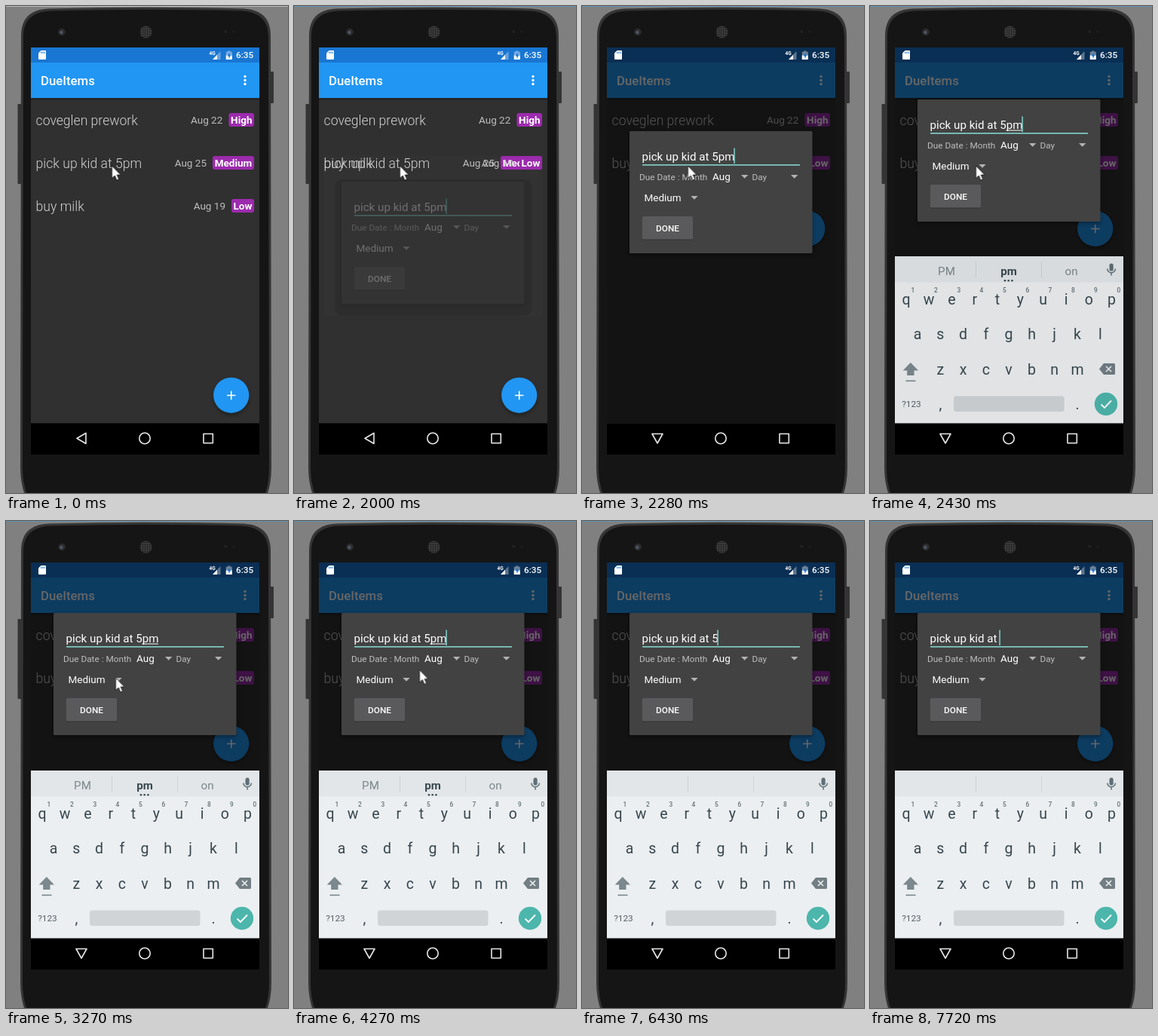
Animation, 374 px wide and 646 px high, one loop 8 s. Source, as an HTML page:

```html
<!DOCTYPE html>
<html lang="en">
<head>
<meta charset="utf-8">
<title>Task list</title>
<style>
html, body { margin: 0; width: 100%; height: 100%; overflow: hidden; background: #808080; }
svg { display: block; width: 374px; height: 646px; font-family: Roboto, "Open Sans", sans-serif; }
.task { font-size: 17.6px; font-weight: 300; fill: #d2d2d2; }
.date { font-size: 13.5px; fill: #bdbdbd; }
.tag { font-size: 13.5px; font-weight: 700; fill: #fff; }
.badge { fill: #9c2bad; }
.s12 { font-size: 11.8px; }
.s13 { font-size: 13.5px; }
.s15 { font-size: 15.15px; }
.med { font-weight: 500; }
.bold { font-weight: 700; }
.mid { text-anchor: middle; }
.keys { font-size: 19.5px; fill: #37474f; text-anchor: middle; }
.hints { font-size: 8.4px; font-weight: 500; fill: #667177; text-anchor: middle; }

/* All changes are hard cuts on one shared 8 s clock. */
.a { animation: 8s step-end infinite; }
#top { animation-name: top; }
#oldRow { animation-name: oldRow; }
#milk { animation-name: milk; }
#ghost { animation-name: ghost; }
#fab { animation-name: fab; }
#dim { animation-name: dim; }
#back { animation-name: back; }
#down { animation-name: down; }
#dialog { animation-name: dialog; }
#kbd { animation-name: kbd; }
#press { animation-name: press; }
#words1 { animation-name: words1; }
#words2 { animation-name: words2; }
#dots { animation-name: dots; }
#five { animation-name: five; }
#pee { animation-name: pee; }
#em { animation-name: em; }
#compose { animation-name: compose; }
#caret { animation-name: caret; }
#mouse { animation-name: mouse; }

@keyframes top { 0% { fill: #bdbdbd } 12.875%, 100% { fill: #5c93b6 } }
@keyframes oldRow { 0% { opacity: 1 } 26.625%, 100% { opacity: 0 } }
@keyframes milk { 0% { transform: none } 25%, 100% { transform: translateY(-57px) } }
@keyframes ghost { 0% { opacity: 0 } 25% { opacity: 1 } 26.625%, 100% { opacity: 0 } }
@keyframes fab { 0% { transform: translateY(221px) } 28.5%, 100% { transform: none } }
@keyframes dim { 0% { opacity: 0 } 26.625% { opacity: .48 } 28.5%, 100% { opacity: .6 } }
@keyframes back { 0% { opacity: 1 } 26.625%, 100% { opacity: 0 } }
@keyframes down { 0% { opacity: 0 } 26.625%, 100% { opacity: 1 } }
@keyframes dialog {
  0% { opacity: 0; transform: translateY(111px) }
  25% { opacity: .32; transform: translateY(111px) }
  26.625% { opacity: .9; transform: translateY(111px) }
  28.5% { opacity: 1; transform: translateY(44px) }
  30.375% { opacity: 1; transform: translateY(2px) }
  32%, 100% { opacity: 1; transform: none }
}
@keyframes kbd {
  0% { opacity: 0; transform: translateY(1px) }
  30.375% { opacity: .95; transform: translateY(1px) }
  32%, 100% { opacity: 1; transform: none }
}
@keyframes press {
  0% { opacity: 0 } 73.125% { opacity: 1 } 78.5% { opacity: 0 }
  83.875% { opacity: 1 } 85.75%, 100% { opacity: 0 }
}
@keyframes words1 { 0% { opacity: 1 } 75%, 100% { opacity: 0 } }
@keyframes words2 { 0% { opacity: 0 } 75% { opacity: 1 } 80.375%, 100% { opacity: 0 } }
@keyframes dots { 0% { opacity: 1 } 80.375%, 100% { opacity: 0 } }
@keyframes five { 0% { visibility: visible } 83.875%, 100% { visibility: hidden } }
@keyframes pee { 0% { visibility: visible } 76.875%, 100% { visibility: hidden } }
@keyframes em { 0% { visibility: visible } 73.125%, 100% { visibility: hidden } }
@keyframes compose {
  0% { width: 0 } 30.375% { width: 21.5px } 73.125% { width: 8.5px } 76.875%, 100% { width: 0 }
}
@keyframes caret {
  0% { opacity: 1; transform: none }
  35.5% { opacity: 0; transform: none }
  42.75% { opacity: 1; transform: none }
  47.75% { opacity: 0; transform: none }
  53.375% { opacity: 1; transform: none }
  60.375% { opacity: 0; transform: none }
  65.75% { opacity: 1; transform: none }
  73.125% { opacity: 1; transform: translateX(-13px) }
  76.875% { opacity: 1; transform: translateX(-22px) }
  83.875% { opacity: 1; transform: translateX(-30px) }
  91.125% { opacity: 0; transform: translateX(-30px) }
  96.5%, 100% { opacity: 1; transform: translateX(-30px) }
}
@keyframes mouse {
  0% { opacity: 1; transform: translate(140.5px, 212px) }
  40.875% { opacity: 1; transform: translate(145.5px, 208px) }
  42.75% { opacity: 1; transform: translate(151px, 204px) }
  44.25% { opacity: 1; transform: translate(156.5px, 200px) }
  46.25% { opacity: 1; transform: translate(157.5px, 199px) }
  47.75% { opacity: 1; transform: translate(158.5px, 197px) }
  49.625% { opacity: 1; transform: translate(163.5px, 188px) }
  51.5% { opacity: 1; transform: translate(163.5px, 189px) }
  53.375% { opacity: 1; transform: translate(166.5px, 197.5px) }
  73.125%, 100% { opacity: 0; transform: translate(166.5px, 197.5px) }
}
</style>
</head>
<body>
<svg viewBox="0 0 374 646" width="374" height="646">
  <defs>
    <filter id="soft" x="-30%" y="-30%" width="160%" height="160%"><feGaussianBlur stdDeviation="2.5"/></filter>
    <linearGradient id="shade" x1="0" y1="0" x2="0" y2="1">
      <stop offset="0" stop-opacity=".35"/><stop offset="1" stop-opacity="0"/>
    </linearGradient>
    <pattern id="mesh" width="3" height="3" patternUnits="userSpaceOnUse">
      <rect width="3" height="3" fill="#404040"/><circle cx="1.5" cy="1.5" r="1" fill="#181818"/>
    </pattern>
    <clipPath id="screen"><rect x="33" y="55" width="303" height="540"/></clipPath>
  </defs>

  <!-- phone -->
  <rect width="374" height="646" fill="#808080"/>
  <rect x="15.5" y="130" width="6" height="106" rx="1" fill="#343434"/>
  <rect x="350" y="87" width="5" height="42" rx="1" fill="#343434"/>
  <path d="M24 646Q19 630 19 612L20 40C20 16 32 5 56 3.500Q186 0 315 3.500C339 5 351 16 351 40L352 612Q352 632 347 646Z" fill="#353535"/>
  <path d="M27 646Q22 630 22 612L23 41C23 19 35 8 58 6.500Q186 3 313 6.500C336 8 348 19 348 41L349 612Q349 632 344 646Z" fill="#151515"/>
  <circle cx="74" cy="34.500" r="4.800" fill="#2c2c2c"/>
  <circle cx="73.500" cy="35" r="2.200" fill="#4f5566"/>
  <circle cx="185.500" cy="34.500" r="8" fill="url(#mesh)"/>
  <circle cx="291.500" cy="34" r="2.500" fill="#1f1f1f"/>
  <circle cx="302" cy="34" r="2" fill="#1d1d1d"/>
  <rect id="top" class="a" width="374" height="1" fill="#bdbdbd"/>

  <g clip-path="url(#screen)">
    <rect x="33" y="55" width="303" height="540" fill="#303030"/>

    <!-- list -->
    <g id="ghost" class="a">
      <rect x="39" y="198" width="290" height="214" fill="#323232"/>
      <rect x="54" y="230" width="262" height="181" rx="11" fill="#2d2d2d"/>
    </g>
    <g>
      <text class="task" x="39.600" y="157.500">coveglen prework</text>
      <text class="date" x="245" y="156">Aug 22</text>
      <rect class="badge" x="295.500" y="142" width="33.500" height="18" rx="3"/>
      <text class="tag mid" x="312.300" y="156">High</text>
    </g>
    <g id="oldRow" class="a">
      <text class="task" x="39.600" y="214.500">pick up kid at 5pm</text>
      <text class="date" x="223.700" y="213">Aug 25</text>
      <rect class="badge" x="274" y="199" width="55" height="18" rx="3"/>
      <text class="tag mid" x="301.500" y="213">Medium</text>
    </g>
    <g id="milk" class="a">
      <text class="task" x="39.600" y="271.500">buy milk</text>
      <text class="date" x="248.700" y="270">Aug 19</text>
      <rect class="badge" x="299" y="256" width="30" height="18" rx="3"/>
      <text class="tag mid" x="314" y="270">Low</text>
    </g>

    <g id="fab" class="a">
      <circle cx="298.700" cy="298" r="24" opacity=".3" filter="url(#soft)"/>
      <circle cx="298.700" cy="295.300" r="23.600" fill="#2196f3"/>
      <path d="M293 295.500h11.500M298.700 289.700v11.500" stroke="#fff" stroke-width="1.600"/>
    </g>

    <!-- bars -->
    <rect x="33" y="122" width="303" height="4" fill="url(#shade)"/>
    <rect x="33" y="75" width="303" height="47" fill="#2196f3"/>
    <rect x="33" y="55" width="303" height="20" fill="#1976d2"/>
    <text class="med" x="46" y="105" font-size="16.800" fill="#fff">DueItems</text>
    <g fill="#fff">
      <circle cx="317" cy="93.500" r="1.700"/><circle cx="317" cy="98.500" r="1.700"/><circle cx="317" cy="103.500" r="1.700"/>
    </g>
    <rect id="dim" class="a" x="33" y="55" width="303" height="498" opacity="0"/>

    <g fill="#fff">
      <path d="M46.500 59H52Q53 59 53 60V70Q53 71 52 71H44Q43 71 43 70V62.500Z"/>
      <path d="M46.800 60.500v2.500M48.900 60.500v2.500M51 60.500v2.500" stroke="#1976d2"/>
      <text class="bold" x="269.500" y="64.500" font-size="6.500">4G</text>
      <path d="M274 71L284.500 60V71Z" opacity=".35"/>
      <path d="M274 71L280 64.700V71Z"/>
      <path d="M294 59.500h3.500v1.300h2.300V71h-8V60.800h2.200Z" opacity=".4"/>
      <path d="M291.800 65.500h8V71h-8Z"/>
      <path d="M296.800 61.700L293.500 66.500H295.500V70L298.300 65H296.500Z" fill="#1976d2"/>
      <text class="s12 med" x="305" y="69">6:35</text>
    </g>

    <!-- dialog -->
    <g id="dialog" class="a" fill="#fff">
      <rect x="62" y="123" width="244" height="164" rx="3" fill="#000" opacity=".3" filter="url(#soft)"/>
      <rect x="63" y="122" width="242.500" height="162" rx="1.500" fill="#424242"/>
      <text class="s15" x="79.500" y="160.500" xml:space="preserve">pick up kid at <tspan id="five" class="a">5</tspan><tspan id="pee" class="a">p</tspan><tspan id="em" class="a">m</tspan></text>
      <rect id="compose" class="a" x="180.500" y="162.500" width="0" height="1"/>
      <rect x="80" y="166" width="209" height="1.700" fill="#80cbc4"/>
      <rect id="caret" class="a" x="201.300" y="144.500" width="1.600" height="20.500" fill="#80cbc4"/>
      <g class="s12" fill="#bdbdbd">
        <text x="76" y="186.500">Due Date : Month</text>
        <text x="225.500" y="186.500">Day</text>
      </g>
      <text class="s13" x="173" y="187">Aug</text>
      <text class="s13" x="82.500" y="215">Medium</text>
      <path d="M211 180h9.400l-4.700 4.700ZM277 180h9.400l-4.700 4.700ZM144.300 208h9.400l-4.700 4.700Z" fill="#b3b3b3"/>
      <rect x="80" y="236.500" width="67" height="30" rx="1.500" fill="#000" opacity=".25"/>
      <rect x="80" y="235" width="67" height="30.500" rx="1.500" fill="#5a5a5c"/>
      <text class="s12 med mid" x="113.500" y="255">DONE</text>
    </g>

    <!-- keyboard -->
    <g id="kbd" class="a" opacity="0">
      <rect x="33" y="331" width="303" height="223" fill="#eceff1"/>
      <rect x="33" y="331" width="303" height="34.500" fill="#e2e6e9"/>
      <path d="M140.500 338v22M227.500 338v22" stroke="#cdd3d6"/>
      <g id="words1" class="a s15 mid" fill="#7b878c">
        <text x="101.500" y="355.500">PM</text>
        <text class="bold" x="184" y="355.500" fill="#37474f">pm</text>
        <text x="267" y="355.500">on</text>
      </g>
      <g id="words2" class="a s15 mid" fill="#7b878c">
        <text x="101.500" y="355.500">pro</text>
        <text class="bold" x="184" y="355.500" fill="#37474f">p</text>
        <text x="267" y="355.500">play</text>
      </g>
      <g id="dots" class="a" fill="#37474f">
        <circle cx="179" cy="363.300" r="1.300"/><circle cx="183.700" cy="363.300" r="1.300"/><circle cx="188.400" cy="363.300" r="1.300"/>
      </g>
      <rect x="317.500" y="340.500" width="5.200" height="10" rx="2.600" fill="#5f6e75"/>
      <path d="M314.800 347.500a5.300 5.300 0 0 0 10.600 0M320.100 353v3.500" fill="none" stroke="#5f6e75" stroke-width="1.500"/>

      <g class="hints">
        <text x="57 87.500 118 148 178.500 209 239 269.500 299.500 330" y="378.500">1234567890</text>
      </g>
      <g class="keys">
        <text x="48 78 108.300 138.800 169 199.300 229.600 260 290.300 320.500" y="394.500">qwertyuiop</text>
        <text x="63 93.300 123.500 153.800 184 214.500 244.700 275 305.300" y="441">asdfghjkl</text>
        <text x="93.300 123.500 153.800 184 214.500 244.700 275" y="487.500">zxcvbnm</text>
        <text x="93.500 275" y="533.500">,.</text>
        <text class="s12" x="55" y="531" fill="#546068">?123</text>
      </g>
      <path d="M53.800 472L64 482.500H58.500V489H49.200V482.500H43.700Z" fill="#7b888e"/>
      <rect x="47.500" y="495.500" width="13" height="1.600" fill="#7b888e"/>
      <circle id="press" class="a" cx="314" cy="481" r="19" fill="#e5e8ea"/>
      <path d="M310 473H323.500Q325 473 325 474.500V486.500Q325 488 323.500 488H310L304 480.500Z" fill="#717e84"/>
      <path d="M313 477l7 7M320 477l-7 7" stroke="#eceff1" stroke-width="1.600"/>
      <rect x="111" y="516.500" width="146.500" height="20.500" rx="3" fill="#d0d4d7"/>
      <circle cx="313" cy="527" r="15.200" fill="#4db6ac"/>
      <path d="M306.500 527.500l4.500 4.500 9-9.500" fill="none" stroke="#fff" stroke-width="1.900"/>
    </g>

    <!-- navigation -->
    <rect x="33" y="553.500" width="303" height="42" fill="#000"/>
    <g fill="none" stroke="#e8e8e8" stroke-width="1.600" stroke-linejoin="round">
      <path id="back" class="a" d="M94 573.500L106 566.500V580.500Z"/>
      <path id="down" class="a" d="M93 567.500H107L100 580Z" opacity="0"/>
      <circle cx="184" cy="573.500" r="7.200"/>
      <rect x="262" y="567.500" width="12.300" height="12.300"/>
    </g>
  </g>

  <path id="mouse" class="a" d="M0 0V16.500L3.800 13L6.400 19L9.200 17.800L6.700 12H11.500Z" fill="#fff" stroke="#111" stroke-width=".8"/>
</svg>
</body>
</html>
```
